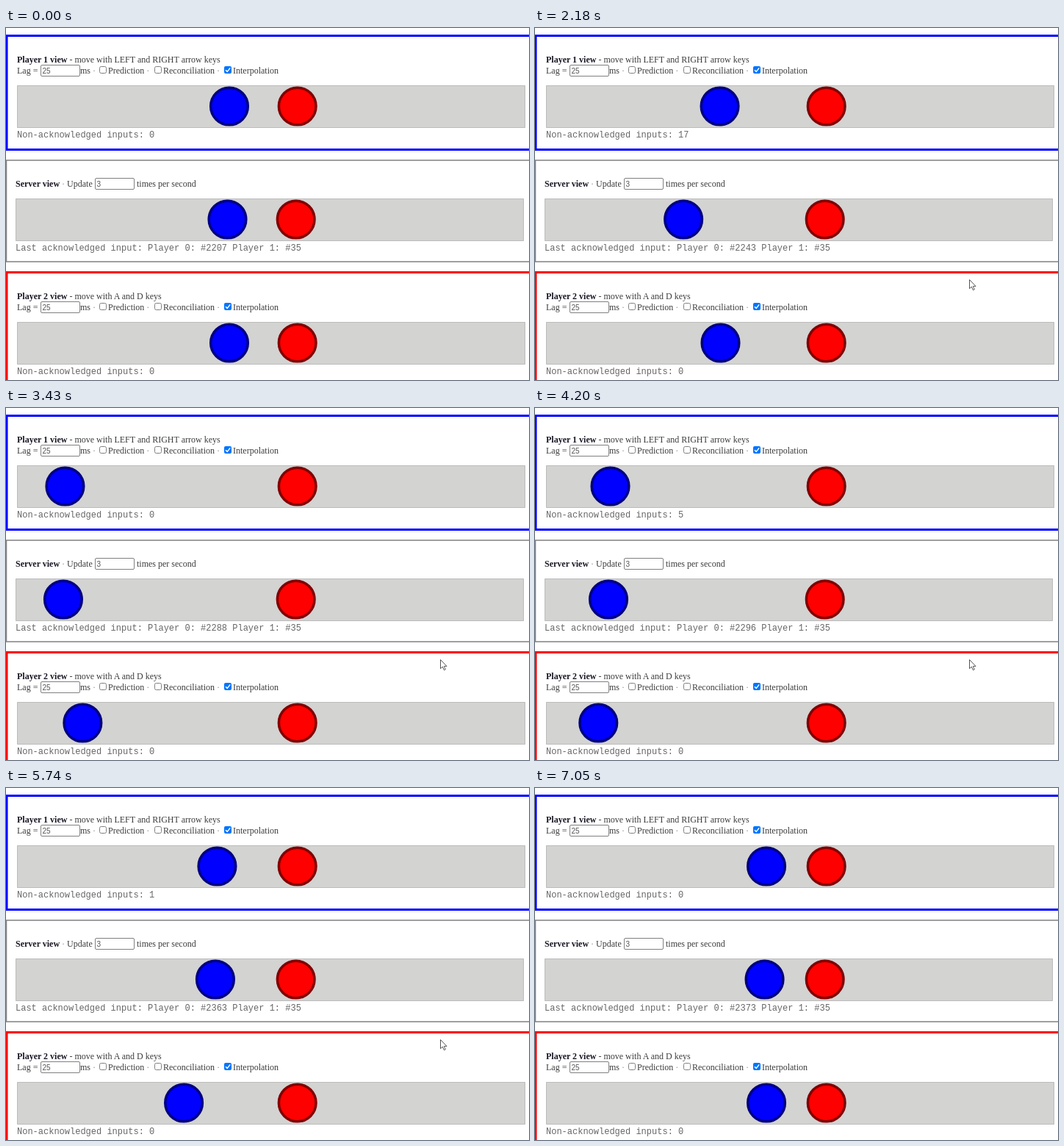
Animation of 712 by 479 pixels, one loop 7.5 s. Source, as an HTML page:

```html
<!DOCTYPE html>
<html lang="en">
<head>
<meta charset="utf-8">
<title>Entity interpolation</title>
<style>
  html, body { margin: 0; width: 100%; height: 100%; overflow: hidden; background: #fff; }
  svg { display: block; width: 712px; height: 479px; }
  text { font: 12px "Liberation Serif", "Times New Roman", serif; fill: #3c3c3c; white-space: pre; }
  .bold { font-weight: bold; fill: #1c1826; }
  .dot { fill: #888; }
  .mono { font: 12px "Liberation Mono", "Courier New", monospace; fill: #666; }
  .field { font: 10px "Liberation Sans", Arial, sans-serif; fill: #555; }
  .box { fill: #fff; stroke: #808080; }
  .track { fill: #d3d3d2; stroke: #8c8c8c; stroke-dasharray: 1 1; }
  .blue { fill: #00f; stroke: #000080; stroke-width: 3.5; }
  .red { fill: #f00; stroke: #800000; stroke-width: 3.5; }
</style>
</head>
<body>
<svg id="stage" viewBox="0 0 712 479"></svg>
<script>
const LOOP = 7500;
const START_X = 304, SERVER_SHIFT = -2.5;
const FIRST_INPUT = 2207, INPUT_MS = 20, INPUT_STEP = 2.76;
const UPDATE_MS = 1000 / 3, LAG = 25, SCREEN_LAG = 15;

// Key presses of player 1, in game time
const holds = [
  { from: -233, to: -103, direction: -1 },
  { from: 64, to: 1574, direction: -1 },
  { from: 2164, to: 3874, direction: 1 }
];

const pace = [[0, -1180], [2180, 682], [2910, 1336], [4200, 2446], [5110, 3166], [5740, 3702], [7500, 5110]];

const mix = (a, b, p) => a + (b - a) * p;
const progress = (t, from, to) => Math.min(1, Math.max(0, (t - from) / (to - from)));

function gameTime(t) {
  const i = pace.findIndex(([end]) => end > t);
  const [a, b] = [pace[i - 1], pace[i]];
  return mix(a[1], b[1], progress(t, a[0], b[0]));
}

// Inputs given up to a game time, and where they put the ball
function inputsAt(time) {
  let count = 0, x = START_X;
  for (const { from, to, direction } of holds) {
    const steps = Math.max(0, Math.floor((Math.min(time, to) - from) / INPUT_MS));
    count += steps;
    x += direction * steps * INPUT_STEP;
  }
  return { count, x };
}

const serverState = tick => inputsAt(tick * UPDATE_MS);

const text = (x, y, value, style = "", id = "") =>
  `<text x="${x}" y="${y}" class="${style}" id="${id}">${value}</text>`;

const field = (x, y, value) =>
  `<rect class="box" x="${x + .5}" y="${y + .5}" width="53" height="15" rx="1.5"/>` +
  text(x + 2.5, y + 12, value, "field");

const checkbox = (x, checked) => checked
  ? `<rect x="${x}" y="52" width="10" height="10" rx="2" fill="#0075ff"/>
     <path d="M${x + 2} 57.2l2.2 2.2 4-5" fill="none" stroke="#fff" stroke-width="1.5"/>`
  : `<rect class="box" x="${x + .5}" y="52.5" width="9" height="9" rx="2"/>`;

const arena = (x, y, id) =>
  `<rect class="track" x="${x + .5}" y="${y + .5}" width="691" height="57"/>
   <circle class="blue" id="${id}" cx="${x + 289}" cy="${y + 28.5}" r="25.3"/>
   <circle class="red" cx="${x + 381.7}" cy="${y + 28.5}" r="25.3"/>`;

const client = (number, keys, color, top, id) => `<g transform="translate(0 ${top})">
  <path d="M720 10.5H1V165.5H720" fill="none" stroke="${color}" stroke-width="3"/>
  ${text(15, 47, `<tspan class="bold">Player ${number} view</tspan> - move with ${keys} keys`)}
  ${text(15, 62, "Lag =")}${field(47, 50, "25")}
  ${text(101, 62, 'ms <tspan class="dot">·</tspan>')}
  ${checkbox(127)}${text(139, 62, 'Prediction <tspan class="dot">·</tspan>')}
  ${checkbox(202)}${text(214, 62, 'Reconciliation <tspan class="dot">·</tspan>')}
  ${checkbox(297, true)}${text(309, 62, "Interpolation")}
  ${arena(15, 78, id)}
  ${text(15, 149, "Non-acknowledged inputs: 0", "mono", id + "Status")}
</g>`;

const server = `
  <path d="M720 180H.5V318H720" fill="none" stroke="#808080" stroke-width="1.5"/>
  ${text(13, 216, '<tspan class="bold">Server view</tspan> <tspan class="dot">·</tspan> Update')}
  ${field(121, 204, "3")}${text(178, 216, "times per second")}
  ${arena(13, 232, "serverBall")}
  ${text(13, 303, "", "mono", "serverStatus")}`;

const byId = id => document.getElementById(id);
byId("stage").innerHTML =
  client(1, "LEFT and RIGHT arrow", "#00f", 0, "ownBall") + server +
  client(2, "A and D", "#f00", 322, "remoteBall") +
  `<path id="pointer" d="M0 0V12.2L2.8 9.6L4.9 14.2L6.8 13.3L4.8 8.9H8.5Z"
    fill="#fff" stroke="#555" stroke-width="1"/>`;

const [ownBall, ownStatus, serverBall, serverStatus, remoteBall, pointer] =
  ["ownBall", "ownBallStatus", "serverBall", "serverStatus", "remoteBall", "pointer"].map(byId);

function renderGame(now) {
  const update = (now - LAG) / UPDATE_MS, tick = Math.floor(update);
  const previous = serverState(tick - 1), received = serverState(tick);
  const current = serverState(Math.floor(now / UPDATE_MS));
  const pending = inputsAt(now - SCREEN_LAG).count - received.count;

  ownBall.setAttribute("cx", received.x);
  serverBall.setAttribute("cx", current.x + SERVER_SHIFT);
  remoteBall.setAttribute("cx", mix(previous.x, received.x, update - tick));
  ownStatus.textContent = `Non-acknowledged inputs: ${pending}`;
  serverStatus.textContent =
    `Last acknowledged input: Player 0: #${FIRST_INPUT + current.count} Player 1: #35`;
}

// The pointer swings in past its resting place and later speeds away
function renderPointer(t) {
  const arrive = progress(t, 20, 500), leave = progress(t, 6800, 7050);
  const away = (1 - arrive) ** 2 * (1 - 2.4 * arrive) + leave ** 2;
  pointer.setAttribute("transform", `translate(${591.5 + 81 * away} ${342.5 + 140 * away})`);
}

const start = performance.now();
function frame() {
  const t = (performance.now() - start) % LOOP;
  renderGame(gameTime(t));
  renderPointer(t);
  requestAnimationFrame(frame);
}
frame();
</script>
</body>
</html>
```
